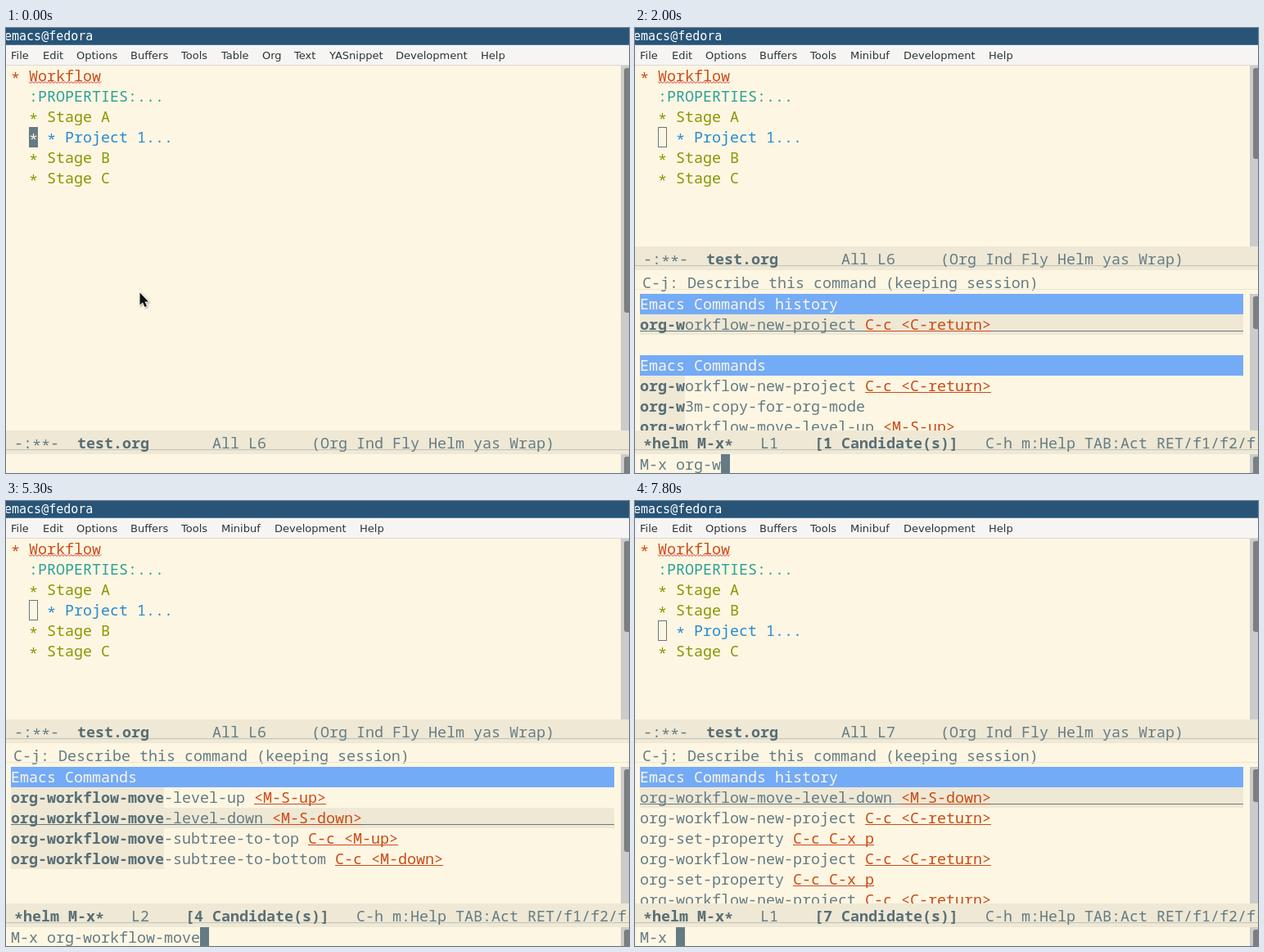
Write an HTML page with a canvas that moves like this. It is 761 px wide and 544 px high and loops after 8000 ms.

```html
<!DOCTYPE html>
<html lang="en">
<head>
<meta charset="utf-8">
<title>Org workflow demo</title>
<style>
html, body { margin: 0; width: 100%; height: 100%; overflow: hidden; background: #fdf6e3; }
canvas { display: block; }
</style>
</head>
<body>
<canvas id="stage" width="761" height="544"></canvas>
<script>
const ctx = document.getElementById('stage').getContext('2d');
const W = 761, H = 544, LOOP = 8000, COL = 11, ROW = 25, LEFT = 6;
const MONO = '18.333px "Noto Sans Mono", monospace';
const C = {
  bg: '#fdf6e3', bar: '#eee8d5', text: '#657b83', strong: '#586e75',
  orange: '#cb4b16', red: '#dc322f', cyan: '#2aa198', green: '#859900',
  blue: '#268bd2', head: '#74abf6', rule: '#bfc2b8'
};

const MENU = [['File', 6], ['Edit', 45], ['Options', 86], ['Buffers', 152], ['Tools', 214]];
const ORG_MENU = [['Table', 263], ['Org', 313], ['Text', 352], ['YASnippet', 395],
  ['Development', 476], ['Help', 580]];
const MINI_MENU = [['Minibuf', 263], ['Development', 328], ['Help', 432]];

const INPUT = 'org-workflow-move';
// [time, characters typed] and [time, characters the list has matched]
const TYPED = [[0, 0], [1400, 1], [1500, 2], [1700, 3], [1800, 4], [1900, 5], [2100, 6],
  [2200, 7], [2300, 8], [2800, 12], [3100, 13], [3400, 14], [3600, 15], [3900, 17], [7800, 0]];
const MATCHED = [[0, 0], [1500, 1], [1600, 2], [1900, 4], [2000, 5], [2200, 6], [2300, 7],
  [2400, 8], [3000, 12], [3200, 13], [3500, 14], [3600, 15], [3900, 17], [7800, 0]];
const CURSOR = [[0, 1], [300, 0], [800, 1], [4300, 0], [4800, 1], [5800, 0],
  [6300, 1], [6900, 0], [7400, 1]];

const NEW = ['org-workflow-new-project', 'C-c <C-return>'];
const SET = ['org-set-property', 'C-c C-x p'];
const UP = ['org-workflow-move-level-up', '<M-S-up>'];
const DOWN = ['org-workflow-move-level-down', '<M-S-down>'];
const TOP = ['org-workflow-move-subtree-to-top', 'C-c <M-up>'];
const BOTTOM = ['org-workflow-move-subtree-to-bottom', 'C-c <M-down>'];
const W3M = ['org-w3m-copy-for-org-mode'];
const MAGIT = ['magit-status', 'C-x g'];
const HISTORY = 'Emacs Commands history', COMMANDS = 'Emacs Commands';

const at = (steps, t) => steps.filter(s => s[0] <= t).pop()[1];

function rect(x, y, w, h, color) {
  ctx.fillStyle = color;
  ctx.fillRect(x, y, w, h);
}

// Asterisks sit at mid height, so they are set lower than the other glyphs.
function mono(str, x, y, color, bold) {
  ctx.font = (bold ? 'bold ' : '') + MONO;
  ctx.fillStyle = color;
  ctx.fillText(str.replace(/\*/g, ' '), x, y);
  [...str].forEach((ch, i) => {
    if (ch === '*') ctx.fillText(ch, x + i * COL, y + 3);
  });
}

function scrollbar(top, bottom, from, to) {
  rect(751, top, 10, bottom - top, '#cbcbcb');
  ctx.fillStyle = '#7c7f80';
  ctx.beginPath();
  ctx.roundRect(755, from, 9, to - from, 3);
  ctx.fill();
}

function modeline(top, parts) {
  rect(0, top, W, 29, C.bar);
  rect(0, top + 23, W, 1, C.rule);
  for (const [col, str, bold] of parts)
    mono(str, 10 + col * COL, top + 22, bold ? C.strong : C.text, bold);
}

function chrome(open) {
  rect(0, 0, W, 21, '#285577');
  rect(0, 20, W, 1, '#4c7899');
  ctx.font = '15px "DejaVu Sans Mono", monospace';
  ctx.fillStyle = '#fff';
  ctx.fillText('emacs@fedora', -2, 15);
  rect(0, 21, W, 25, '#f6f5f4');
  rect(0, 45, W, 1, '#dcd8d3');
  ctx.font = '13px "DejaVu Sans", sans-serif';
  ctx.fillStyle = '#2e3436';
  for (const [item, x] of [...MENU, ...(open ? MINI_MENU : ORG_MENU)]) ctx.fillText(item, x, 38);
}

function outline(moved, open, cursor) {
  const x = LEFT + 2 * COL;
  const put = (row, str, color, col = 2) =>
    mono(str, LEFT + col * COL, 65 + row * ROW, color);
  put(0, '*', C.orange, 0);
  put(0, 'Workflow', C.orange);
  ctx.strokeStyle = C.red;
  ctx.lineWidth = 1;
  ctx.beginPath();
  for (let i = 0; i <= 44; i++) ctx.lineTo(x + i * 2, i % 2 ? 67.5 : 65.5);
  ctx.stroke();
  put(1, ':PROPERTIES:...', C.cyan);
  put(2, '* Stage A', C.green);
  put(moved ? 3 : 4, '* Stage B', C.green);
  put(5, '* Stage C', C.green);
  const row = moved ? 4 : 3, y = 46 + row * ROW;
  put(row, '* Project 1...', C.blue, 4);
  if (open) {
    ctx.strokeStyle = C.text;
    ctx.strokeRect(x + 0.5, y + 0.5, COL - 1, ROW - 1);
  } else if (cursor) {
    rect(x, y, COL, ROW, C.text);
    put(row, '*', C.bg);
  }
}

function listFor(n, again) {
  if (n >= 14) return [COMMANDS, UP, DOWN, TOP, BOTTOM];
  if (n >= 6) return [HISTORY, NEW, '', COMMANDS, NEW, UP, DOWN];
  if (n === 5) return [HISTORY, NEW, '', COMMANDS, NEW, W3M, UP];
  if (n) return [HISTORY, NEW, SET, '', COMMANDS, SET, NEW];
  return again ? [HISTORY, DOWN, NEW, SET, NEW, SET, NEW] : [HISTORY, NEW, SET, NEW, SET, NEW, MAGIT];
}

function candidates(list, n, selected) {
  ctx.save();
  ctx.beginPath();
  ctx.rect(0, 325, W, 167);
  ctx.clip();
  list.forEach((item, i) => {
    const y = 325 + i * ROW, base = y + 19;
    if (typeof item === 'string') {
      if (item) rect(LEFT, y, 737, ROW, C.head);
      mono(item, LEFT, base, C.bg);
      return;
    }
    const [name, key] = item;
    if (i === selected) {
      rect(LEFT, y, 737, ROW, C.bar);
      rect(LEFT, y + 20, 737, 1, C.text);
    } else if (n) {
      rect(LEFT, y, n * COL, ROW, C.bar);
    }
    mono(name.slice(0, n), LEFT, base, C.strong, true);
    mono(name.slice(n), LEFT + n * COL, base, C.text);
    if (key) {
      const x = LEFT + (name.length + 1) * COL;
      mono(key, x, base, C.orange);
      rect(x, y + 20, key.length * COL, 1, C.orange);
    }
  });
  ctx.restore();
}

function helm(t, cursor) {
  const again = t >= 7800, n = at(MATCHED, t), typed = at(TYPED, t);
  const selected = t >= 5300 && !again ? 2 : 1;
  const count = n >= 14 ? 4 : n >= 5 ? 1 : n ? 2 : again ? 7 : 6;
  mono('C-j: Describe this command (keeping session)', 9, 318, C.text);
  rect(0, 319, W, 1, '#ece5d2');
  candidates(listFor(n, again), n, selected);
  if (t >= 1100) scrollbar(325, 492, 328, n >= 14 ? 429 : n >= 7 ? 407 : 368);
  modeline(492, [
    [0, '*helm M-x*', true], [13, 'L' + selected], [19, `[${count} Candidate(s)]`, true],
    [38, 'C-h m:Help TAB:Act RET/f1/f2/f-n:NthAct']
  ]);
  const prompt = 'M-x ' + INPUT.slice(0, typed);
  mono(prompt, LEFT, 540, C.text);
  if (cursor) rect(LEFT + prompt.length * COL, 521, COL, 23, C.text);
}

function pointer(x, y) {
  ctx.save();
  ctx.translate(x, y);
  ctx.beginPath();
  for (const [px, py] of [[0, 0], [0, 15], [3.5, 12], [6, 17.5], [8.5, 16.5], [6, 11], [10.5, 11]])
    ctx.lineTo(px, py);
  ctx.closePath();
  ctx.shadowColor = 'rgba(0,0,0,.35)';
  ctx.shadowBlur = 2;
  ctx.shadowOffsetX = ctx.shadowOffsetY = 1;
  ctx.lineWidth = 1.6;
  ctx.strokeStyle = '#fff';
  ctx.stroke();
  ctx.shadowColor = 'transparent';
  ctx.fillStyle = '#111';
  ctx.fill();
  ctx.restore();
}

function draw(t) {
  const open = (t >= 1000 && t < 6300) || t >= 7800;
  const moved = t >= 6300, cursor = at(CURSOR, t);
  const bottom = open ? 267 : 492;
  rect(0, 0, W, H, C.bg);
  chrome(open);
  outline(moved, open, cursor);
  const thumb = at([[0, 348], [1000, 194], [1100, 160], [6300, 314], [6400, 348], [7800, 160]], t);
  scrollbar(46, bottom, 49, thumb);
  modeline(bottom, [
    [0, '-:**-'], [7, 'test.org', true], [22, moved ? 'All L7' : 'All L6'],
    [33, '(Org Ind Fly Helm yas Wrap)']
  ]);
  if (open) helm(t, cursor);
  scrollbar(521, H, 524, 560);
  if (t < 1400) pointer(163.5, 323.5);
}

const start = performance.now();
function tick() {
  draw((performance.now() - start) % LOOP);
  requestAnimationFrame(tick);
}
tick();
</script>
</body>
</html>
```
